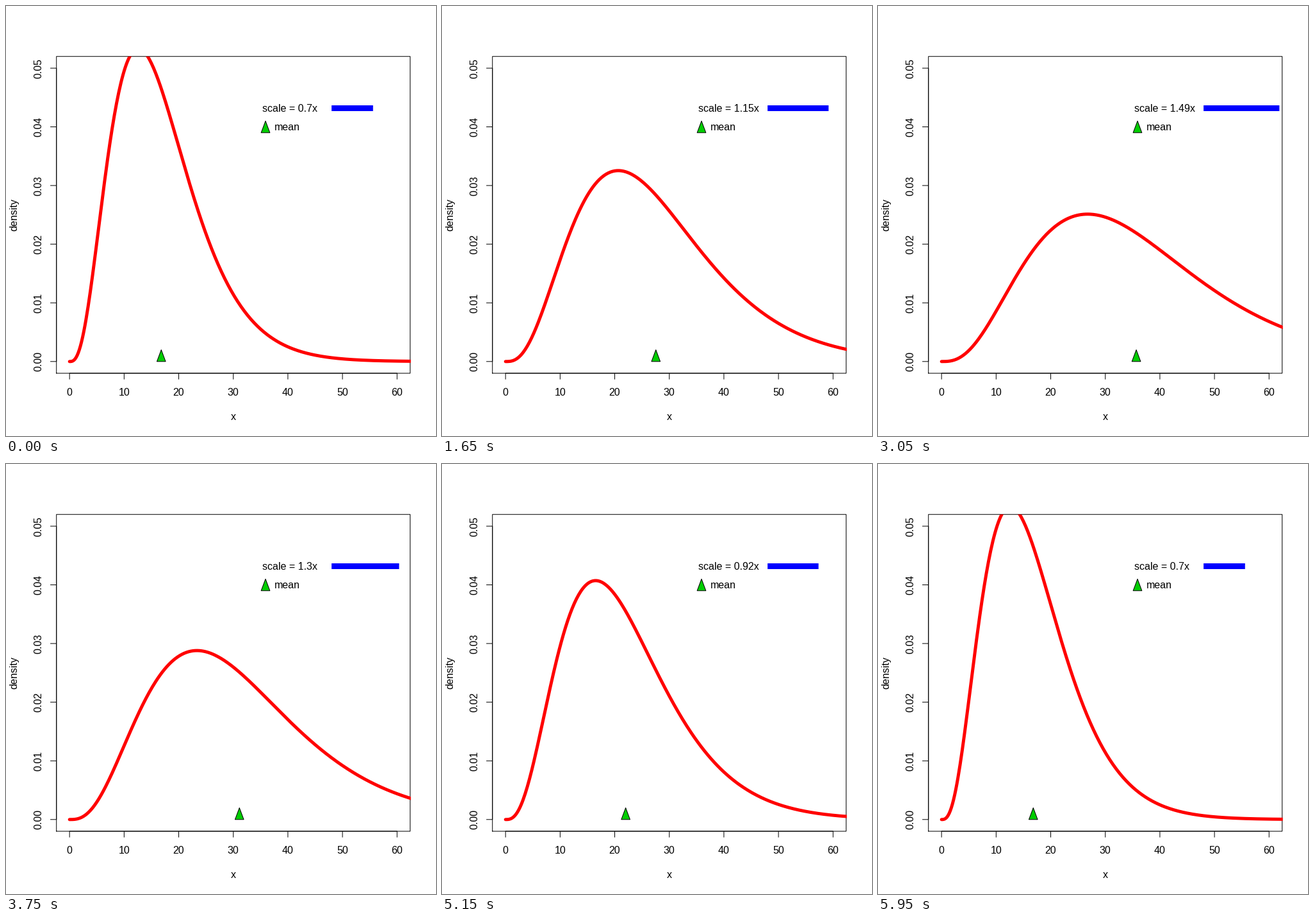
These frames come from a looping animation (671x671 px, 6000 ms). A matplotlib script:

```python
import numpy as np
import matplotlib.pyplot as plt
from matplotlib.animation import FuncAnimation
from matplotlib.patches import Polygon
from matplotlib.path import Path

SIZE, DPI = 671, 64
PT = 72 / DPI                      # points per pixel
LEFT, TOP, RIGHT, BOTTOM = 78.72, 78.72, 630.68, 573.08
X_MIN, X_MAX = -2.4, 62.4
Y_MIN, Y_MAX = -0.002, 0.052
HALF = 60                          # frames from narrow to wide
SHAPE, BASE_SCALE = 4, 6

plt.rcParams["font.family"] = "Liberation Sans"
plt.rcParams["font.size"] = 16 * PT

fig = plt.figure(figsize=(SIZE / DPI, SIZE / DPI), dpi=DPI, facecolor="white")
ax = fig.add_axes([0, 0, 1, 1])
ax.set_xlim(0, SIZE)
ax.set_ylim(SIZE, 0)
ax.axis("off")


def px(x):
    return LEFT + (x - X_MIN) / (X_MAX - X_MIN) * (RIGHT - LEFT)


def py(y):
    return BOTTOM - (y - Y_MIN) / (Y_MAX - Y_MIN) * (BOTTOM - TOP)


def stroke(xs, ys, width=1, color="black", cap="round"):
    line, = ax.plot(xs, ys, color=color, lw=width * PT, snap=False,
                    solid_capstyle=cap, solid_joinstyle="round",
                    scalex=False, scaley=False)
    return line


def label(x, y, text, ha="center", rotation=0):
    return ax.text(x, y, text, ha=ha, va="baseline", rotation=rotation,
                   rotation_mode="anchor", color="black")


def triangle_points(x, y):
    return [(px(x - 0.8), py(y)), (px(x), py(y + 0.002)), (px(x + 0.8), py(y))]


def triangle(x, y):
    return ax.add_patch(Polygon(triangle_points(x, y), closed=True, fc="#00cd00",
                                ec="black", lw=PT, joinstyle="round",
                                snap=False, zorder=3))


def gamma_pdf(x, scale):
    return x ** (SHAPE - 1) * np.exp(-x / scale) / (6 * scale ** SHAPE)


# Frame and axes
stroke([LEFT, RIGHT, RIGHT, LEFT, LEFT], [BOTTOM, BOTTOM, TOP, TOP, BOTTOM])
stroke([px(0), px(60)], [BOTTOM, BOTTOM])
stroke([LEFT, LEFT], [py(0), py(0.05)])
for v in range(0, 61, 10):
    stroke([px(v)] * 2, [BOTTOM, BOTTOM + 9.6], cap="butt")
    label(px(v), 607.6, str(v))
for v in np.arange(6) / 100:
    stroke([LEFT - 9.6, LEFT], [py(v)] * 2, cap="butt")
    label(55.7, py(v), f"{v:.2f}", rotation=90)
label((LEFT + RIGHT) / 2, 646, "x")
label(17.3, (TOP + BOTTOM) / 2, "density", rotation=90)

# Legend
scale_text = label(400, 165, "", ha="left")
bar = stroke([], [], 9, "#0000ff", "butt")
triangle(35.9, 0.039)
label(419, 194, "mean", ha="left")

# Density curve and mean marker
xs = np.linspace(0, 66, 331)
curve = stroke([], [], 5, "#ff0000")
clip = Path([(LEFT, TOP), (RIGHT + 1, TOP), (RIGHT + 1, BOTTOM + 1),
             (LEFT, BOTTOM + 1), (LEFT, TOP)], closed=True)
curve.set_clip_path(clip, ax.transData)
marker = triangle(0, 0)


def update(i):
    step = min(i, 2 * HALF - 1 - i)
    factor = 0.7 + 0.8 * step / (HALF - 1)
    scale = BASE_SCALE * factor
    curve.set_data(px(xs), py(gamma_pdf(xs, scale)))
    marker.set_xy(triangle_points(SHAPE * scale, 0))
    bar.set_data([px(48), px(50 + 8 * factor)], [159.5, 159.5])
    scale_text.set_text(f"scale = {round(factor, 2):g}x")
    return curve, marker, bar, scale_text


anim = FuncAnimation(fig, update, frames=2 * HALF, interval=50,
                     repeat=True, repeat_delay=0, blit=False)
plt.show()
```
